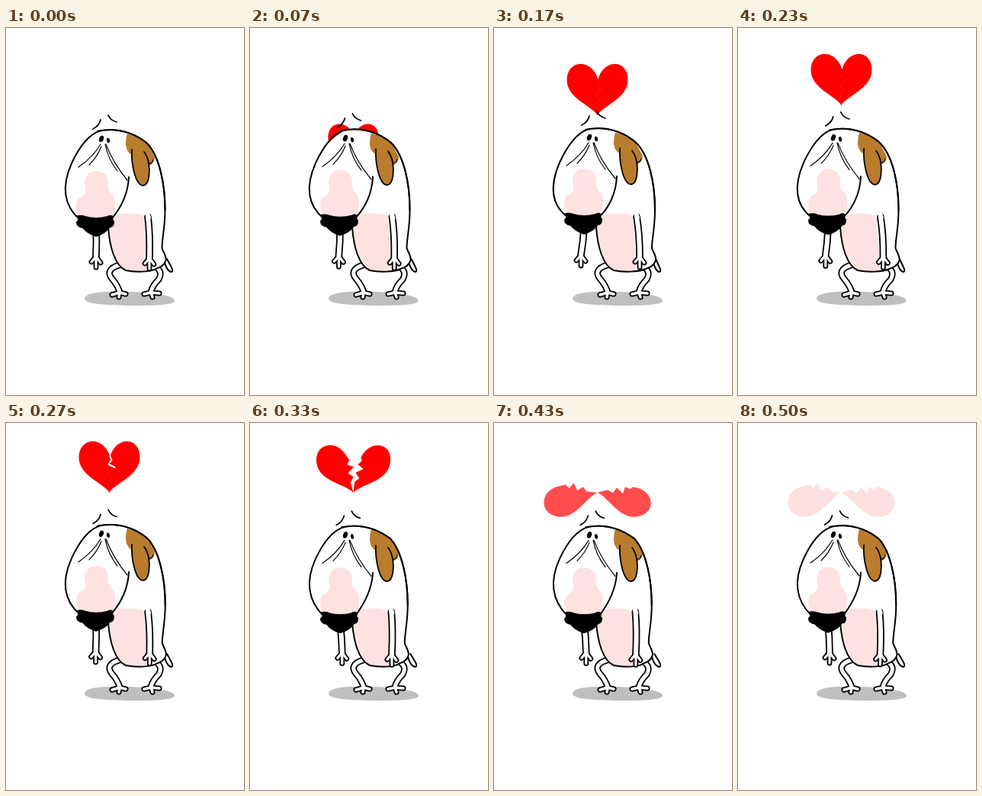
These frames come from a looping animation (312x480 px, 530 ms). An HTML page with a canvas:

```html
<!DOCTYPE html>
<html lang="en">
<head>
<meta charset="utf-8">
<title>Heartbroken dog</title>
<style>
html, body { margin: 0; width: 100%; height: 100%; overflow: hidden; background: #fff; }
canvas { display: block; }
</style>
</head>
<body>
<canvas id="stage" width="312" height="480"></canvas>
<script>
const ctx = document.getElementById('stage').getContext('2d');
const LOOP = 530;
const INK = '#000', WHITE = '#fff', PINK = '#fde2e1', BROWN = '#b97b2c', RED = '#f00';

// Each pose holds until the next: start, sigh, heart tip y, heart scale, split angle, crack, opacity
const poses = [
  [0, 0, 230, 0.7, 0, 0, 0],
  [30, 0.2, 208, 0.75, 0, 0, 1],
  [70, 0.4, 181, 0.83, 0, 0, 1],
  [100, 0.65, 158, 0.91, 0, 0, 1],
  [140, 0.9, 133, 1, 0, 0, 1],
  [170, 1, 114, 1, 0, 0, 1],
  [200, 0.8, 101, 1, 0, 0, 1],
  [240, 0.5, 92, 1, 0, 0, 1],
  [270, 0.1, 91, 1, 0, 4, 1],
  [300, -0.3, 91, 1, 3, 7, 1],
  [330, -0.7, 91, 1, 11, 7, 1],
  [400, -0.8, 91, 1, 45, 7, 1],
  [430, -0.7, 91, 1, 80, 7, 0.7],
  [470, -0.6, 91, 1, 80, 7, 0.4],
  [500, -0.5, 91, 1, 80, 7, 0.12]
];
const crack = [[1, -47], [3, -43], [-1, -37], [7, -33], [-2, -26], [4, -20], [-1, -14], [0, 0]];

function fill(d, color) {
  ctx.fillStyle = color;
  ctx.fill(new Path2D(d));
}

function line(d, width = 2, color = INK) {
  ctx.strokeStyle = color;
  ctx.lineWidth = width;
  ctx.stroke(new Path2D(d));
}

function shape(d, color) {
  fill(d, color);
  line(d);
}

function oval(x, y, rx, ry, angle, color) {
  ctx.fillStyle = color;
  ctx.beginPath();
  ctx.ellipse(x, y, rx, ry, angle, 0, Math.PI * 2);
  ctx.fill();
}

// White limb with a shared black outline
function tubes(parts) {
  for (const [d, width] of parts) line(d, width + 3.6);
  for (const [d, width] of parts) line(d, width, WHITE);
}

function shifted(dx, dy, draw) {
  ctx.save();
  ctx.translate(dx, dy);
  draw();
  ctx.restore();
}

const zigzag = points => points.map(p => p.join()).join(' L');

function drawHeart(tip, scale, angle, cracked, opacity) {
  if (!opacity) return;
  const edge = zigzag(crack);
  const left = `M${edge} C-8 -13 -40 -22 -40 -46 C-40 -59 -32 -67 -22 -67 C-11 -67 -3 -59 1 -47Z`;
  const right = `M${edge} C8 -13 40 -22 40 -46 C40 -59 33 -67 23 -67 C13 -67 4 -59 1 -47Z`;
  ctx.save();
  ctx.globalAlpha = opacity;
  ctx.translate(135.5, tip);
  ctx.scale(scale, scale);
  if (angle) {
    for (const [half, side] of [[left, -1], [right, 1]]) {
      ctx.save();
      ctx.rotate(side * angle * Math.PI / 180);
      fill(half, RED);
      ctx.restore();
    }
  } else {
    fill(left, RED);
    fill(right, RED);
    line('M' + edge, 0.8, RED);
    if (cracked) line('M' + zigzag(crack.slice(0, cracked)), 2, WHITE);
  }
  ctx.restore();
}

function drawLegs() {
  tubes([
    ['M152 309 C132 314 134 322 139 328 Q146 336 149 345', 5],
    ['M149 346 L139 349', 3.5],
    ['M149 346 L148 352', 3.5],
    ['M149 346 L157 348', 3.5]
  ]);
  tubes([
    ['M192 310 C204 316 204 322 200 329 Q192 337 190 345', 5],
    ['M190 346 L181 348', 3.5],
    ['M190 346 L192 352', 3.5],
    ['M190 346 L201 347', 3.5]
  ]);
}

function drawBody(s) {
  const x = 208.5 + 2.5 * s, top = 133 - 2 * s;
  shape(`M${207 + s} 303 Q${210 + s} 317 216 319 Q220 319 217 313 L${211 + s} 302`, WHITE);
  const back = `M120 ${top + 2} C145 ${top - 3} 167 ${top + 4} 184 ${top + 17}
    C${x - 7} ${top + 34} ${x} 205 ${x} 238 C${x} 262 ${x - 4} 274 ${x - 4} 288
    C${x - 2} 294 ${x + 2} 298 ${x + 1} 304 C${x - 1} 311 ${x - 7} 313 ${x - 12} 315
    C190 319 170 320 157 317 C143 311 136 287 134 261`;
  fill(back + ' L100 230Z', WHITE);
  fill(`M134 256 Q136 245 150 243 Q166 241 ${180 + s} 245 Q${184 + s} 270 ${185 + s} 318
    Q168 320 157 317 C143 311 136 287 134 256Z`, PINK);
  line(back);
}

function drawArm(x, y, hand, path) {
  tubes([
    [path, 6],
    [`M${x} ${y} L${x - 6} ${hand - 9}`, 3.2],
    [`M${x} ${y} L${x} ${hand - 2}`, 3.2],
    [`M${x} ${y} L${x + 6} ${hand - 8}`, 3.2]
  ]);
}

function drawRightArm(s) {
  const x = 188 + 3 * s, y = 301 - 2 * s;
  drawArm(x, y, 317 - 2 * s, `M${186 + s} 247 Q${189 + 2 * s} 270 ${x} ${y}`);
  // Open shoulder
  line(`M${184 + s} 240 L${187 + s} 248`, 6, WHITE);
}

function drawLeftArm(s) {
  const x = 118 - 4 * s, y = 299 - 2 * s;
  drawArm(x, y, 315 - 2 * s, `M118 262 Q${119 - 2 * s} 280 ${x} ${y}`);
}

function drawHead(s) {
  const top = 133 - 2 * s, low = -3 * s;
  fill(`M138 ${top} C115 ${top} 97 ${154 - s} 86 ${178 - s} C72 207 76 232 96 ${250 + low}
    L139 ${250 + low} C151 236 161 214 161 192 L165 ${top + 10}Z`, WHITE);

  shifted(0, low, () => {
    fill(`M118 187 C128 187 134 193 134 203 C133 209 134 213 140 218 C144 224 144 237 140 246
      L118 251 L96 246 C90 236 91 225 98 221 C106 217 105 211 103 204 C103 194 109 187 118 187Z`, PINK);
  });
  line(`M122 ${top + 2} C105 ${141 - 2 * s} 93 ${162 - s} 86 ${177 - s} C73 206 75 231 96 ${250 + low}`);
  line(`M161 ${195 - s} C160 216 151 235 138 ${250 + low}`);

  shifted(0, low, () => {
    shape(`M94 246 Q99 245 104 247 Q118 251 133 247 Q139 244 140 248 Q138 251 141 253
      Q141 260 136 260 Q131 268 118 272 Q106 268 101 261 Q93 260 93 254 Q97 251 94 246Z`, INK);
  });

  shifted(0, -2 * s, () => {
    oval(125, 145, 2.9, 4.4, 0.35, INK);
    oval(134, 147, 2, 3.3, -0.2, INK);
    line('M124 152 Q114 169 95 182', 1.2);
    line('M125 155 Q120 168 109 179', 1.2);
    line('M130 152 Q134 172 146 187', 1.2);
    line('M131 152 Q140 176 159 199', 1.2);
  });
}

function drawEar(s) {
  shifted(0, -1.5 * s, () => {
    fill(`M159 138 Q174 142 186 152 L195 169 Q195 176 188 180 L170 168
      Q158 165 157 153 Q157 144 159 138Z`, BROWN);
    fill('M165 160 C164 176 169 206 180 206 C188 205 189 188 187 176 Q185 162 178 153Z', BROWN);
    line('M165 159 C164 176 169 206 180 206 C188 205 189 187 187 176 Q185 167 181 162', 1.8);
    line('M187 177 Q192 178 193 172', 1.1);
  });
  const top = 133 - 2 * s, x = 208.5 + 2.5 * s;
  line(`M120 ${top + 2} C145 ${top - 3} 167 ${top + 4} 184 ${top + 17}
    C${x - 7} ${top + 34} ${x} 205 ${x} 238`);
}

function drawBrows(s) {
  shifted(s, s > 0 ? -5 * s : -2 * s, () => {
    line('M124 120 Q122 128 114 132', 1.8);
    line('M134 114 Q137 121 145 123', 1.8);
  });
}

function render(time) {
  const pose = poses.findLast(p => p[0] <= time);
  const [, sigh, ...heart] = pose;
  ctx.fillStyle = WHITE;
  ctx.fillRect(0, 0, 312, 480);
  ctx.lineCap = ctx.lineJoin = 'round';
  fill('M103 354 C104 346 126 344 156 345 C192 345 222 350 221 357 C219 363 190 363 158 363 C128 362 104 361 103 354Z', '#bfbfbf');
  drawHeart(...heart);
  drawLegs();
  drawLeftArm(sigh);
  drawBody(sigh);
  drawRightArm(sigh);
  drawHead(sigh);
  drawEar(sigh);
  drawBrows(sigh);
}

const start = performance.now();
function tick() {
  render((performance.now() - start) % LOOP);
  requestAnimationFrame(tick);
}
tick();
</script>
</body>
</html>
```
